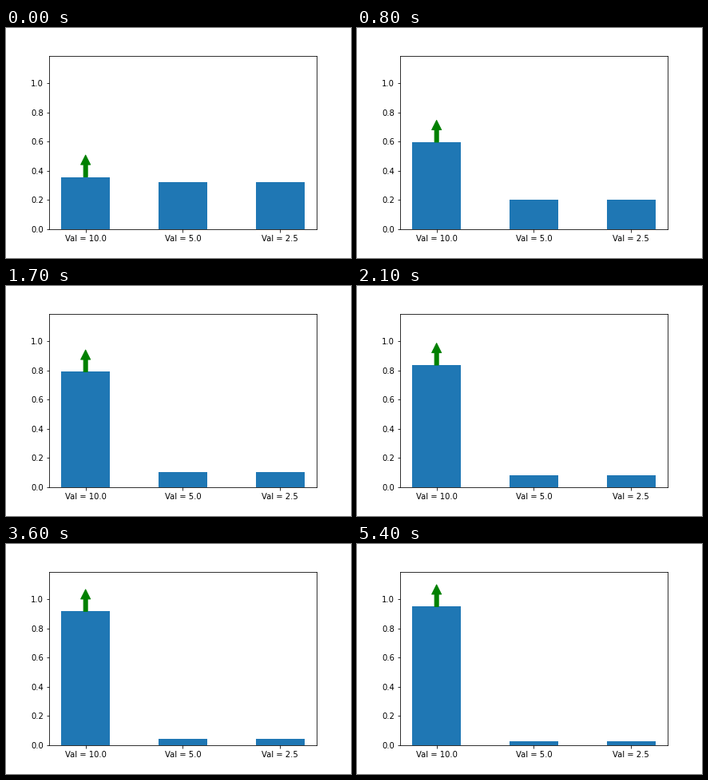
A matplotlib script for the animation above (5.5 s loop, 432x288 px).

```python
import numpy as np
import matplotlib.pyplot as plt
from matplotlib.animation import FuncAnimation

FRAMES = 55
INTERVAL = 100
RATE = 1 / 3
ARROW_LENGTH = 0.15
VALUES = [10.0, 5.0, 2.5]

plt.rcParams["font.family"] = "DejaVu Sans"


def softmax(logits):
    weights = np.exp(logits)
    return weights / weights.sum()


def policy_path(steps):
    """Gradient ascent on the probability of the first action."""
    logits = np.zeros(len(VALUES))
    chosen = np.eye(len(VALUES))[0]
    path = []
    for _ in range(steps):
        probs = softmax(logits)
        logits = logits + RATE * probs[0] * (chosen - probs)
        path.append(softmax(logits))
    return path


path = policy_path(FRAMES)

fig, ax = plt.subplots(figsize=(6, 4), dpi=72)
fig.subplots_adjust(left=0.125, right=0.9, bottom=0.125, top=0.88)

bars = ax.bar(range(len(VALUES)), path[0], width=0.5, color="#1f77b4")
ax.set_xlim(-0.375, 2.375)
ax.set_ylim(0, 1.19)
ax.set_xticks(range(len(VALUES)), [f"Val = {v}" for v in VALUES])
ax.set_yticks(np.arange(0, 1.1, 0.2))

arrow = ax.annotate(
    "", xy=(0, path[0][0] + ARROW_LENGTH), xytext=(0, path[0][0]),
    arrowprops=dict(color="green", width=5, headwidth=12, headlength=12),
)


def update(i):
    for bar, height in zip(bars, path[i]):
        bar.set_height(height)
    top = path[i][0]
    arrow.xy = (0, top + ARROW_LENGTH)
    arrow.set_position((0, top))
    return [*bars, arrow]


anim = FuncAnimation(fig, update, frames=FRAMES, interval=INTERVAL,
                     repeat=True, repeat_delay=0)
plt.show()
```
